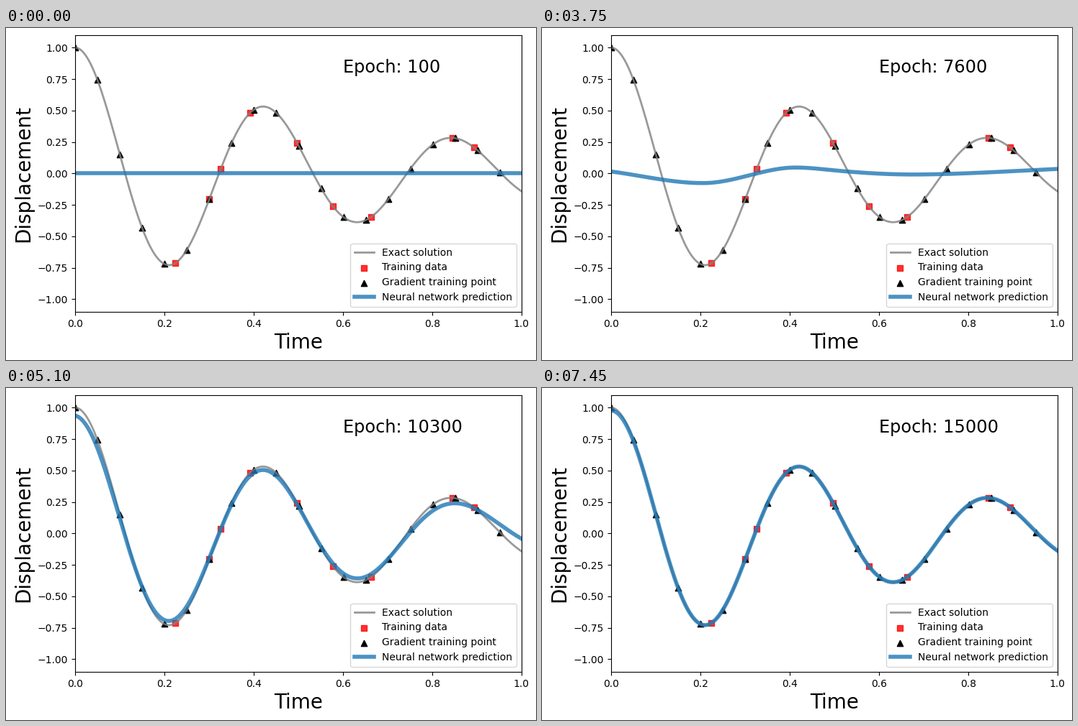
Write a matplotlib script that moves like this. It is 736x462 px and loops after 8000 ms.

```python
import numpy as np
import matplotlib.pyplot as plt
from matplotlib.animation import FuncAnimation

WIDTH, HEIGHT, DPI = 736, 462, 100
FRAMES, INTERVAL, LAST_STEP = 160, 50, 149
DAMPING, OMEGA0 = 1.5, 15

plt.rcParams["font.family"] = "DejaVu Sans"


def oscillator(t):
    """Underdamped oscillator released at rest from 1."""
    w = np.sqrt(OMEGA0**2 - DAMPING**2)
    return np.exp(-DAMPING * t) * (np.cos(w * t) + DAMPING / w * np.sin(w * t))


def hermite(u, start, end, start_slope=0, end_slope=0):
    """Cubic from start to end for u in 0..1 with the given end slopes."""
    return (start + (end - start) * u * u * (3 - 2 * u)
            + start_slope * u * (1 - u)**2 - end_slope * u * u * (1 - u))


def smooth_path(keys, t):
    """Join (time, value, slope) keys with cubics."""
    path = np.zeros_like(t)
    for (t0, v0, s0), (t1, v1, s1) in zip(keys, keys[1:]):
        part = (t >= t0) & (t <= t1)
        span = t1 - t0
        path[part] = hermite((t[part] - t0) / span, v0, v1, s0 * span, s1 * span)
    return path


def mix(a, b, w):
    return a + (b - a) * w


t = np.linspace(0, 1, 500)
exact = oscillator(t)

# Stages the network passes through before it locks on to the solution
line_fit = -0.03 + 0.055 * t
bent_fit = -0.031 + 0.078 * t - 0.024 * t**2
early_wave = smooth_path([(0, .13, -1.8), (.21, -.228, 0), (.41, .17, 0),
                          (.5, .08, -1.3), (.69, -.058, 0), (1, .067, .5)], t)


def near_fit(age):
    """Exact wave, slightly flattened and late, with errors that die out."""
    start_gap = 0.062 * np.exp(-age / 4700)
    shrink = 0.045 * np.exp(-age / 900)
    lag = 0.03 * np.exp(-age / 1700) * t**6
    lead = 0.07 * shrink * np.exp(-(t / 0.15)**2)
    wave = oscillator(t - lag + lead) * (1 - shrink * (1 + 4.5 * t**4))
    return wave - (start_gap - shrink) * np.exp(-(t / 0.05)**2)


def prediction(epoch):
    if epoch <= 3100:
        return line_fit * (1 - np.exp(-(epoch - 100) / 450))
    if epoch <= 5900:
        return mix(line_fit, bent_fit, (epoch - 3100) / 2800)
    if epoch <= 8700:
        return mix(bent_fit, early_wave, ((epoch - 5900) / 2800)**2.5)
    if epoch <= 10300:
        grown = hermite((epoch - 8700) / 1600, 0, 1, 0.45, 0.2)
        return mix(early_wave, near_fit(0), grown**(0.8 + 0.7 * t))
    return near_fit(epoch - 10300)


fig = plt.figure(figsize=(WIDTH / DPI, HEIGHT / DPI), dpi=DPI)
ax = fig.add_axes([95.9 / WIDTH, 67.15 / HEIGHT, 620 / WIDTH, 385 / HEIGHT])
ax.set(xlim=(0, 1), ylim=(-1.1, 1.1))
ax.set_xlabel("Time", fontsize=20)
ax.set_ylabel("Displacement", fontsize=20)

samples = [112, 150, 163, 196, 248, 288, 331, 422, 446]
ax.plot(t, exact, color="grey", lw=2, alpha=0.8, label="Exact solution")
ax.scatter(t[samples], exact[samples], color="red", marker="s", alpha=0.8,
           label="Training data")
ax.scatter(t[::25], exact[::25], color="black", marker="^",
           label="Gradient training point")
curve, = ax.plot(t, prediction(100), color="tab:blue", lw=4, alpha=0.8,
                 label="Neural network prediction")
counter = ax.text(0.6, 0.8, "", fontsize="xx-large", color="black")
ax.legend(loc="lower right")


def update(frame):
    epoch = 100 * (min(frame, LAST_STEP) + 1)
    curve.set_ydata(prediction(epoch))
    counter.set_text(f"Epoch: {epoch}")
    return curve, counter


animation = FuncAnimation(fig, update, frames=FRAMES, interval=INTERVAL,
                          repeat=True, repeat_delay=0)
plt.show()
```
